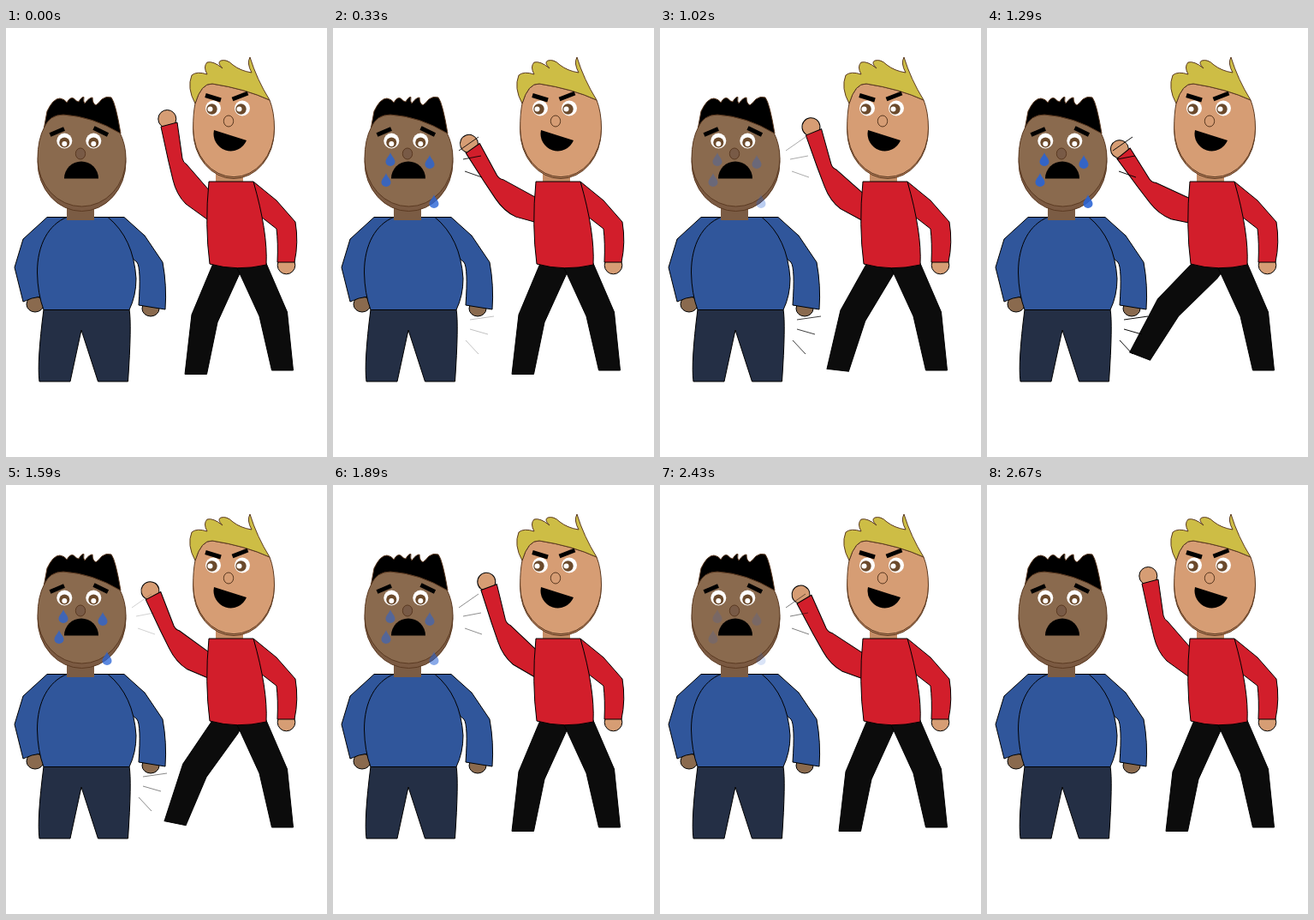
These frames come from a looping animation (375x500 px, 2.7 s). An HTML page:

```html
<!DOCTYPE html>
<html lang="en">
<head>
<meta charset="utf-8">
<title>Bully</title>
<style>
  html, body { margin: 0; width: 100%; height: 100%; overflow: hidden; background: #fff; }
  svg { display: block; width: 375px; height: 500px; }
  .line { stroke: #000; stroke-width: 1; }
  .thin { fill: none; stroke: #000; stroke-width: 1; }
  .blue { fill: #30569b; }
  .red { fill: #d21e2b; }
  .dark { fill: #8a6a4e; }
  .tan { fill: #d69d74; }
  .black { fill: #0c0c0c; }
  .face { stroke: #5b3a22; stroke-width: 1; }
  .white { fill: #fff; }
  .iris { fill: #6b4a2c; }
  .brow { fill: none; stroke: #000; stroke-width: 5; }
</style>
</head>
<body>
<svg viewBox="0 0 375 500">
  <defs>
    <path id="drop" d="M0-8C1-4 5.500-1 5.500 3A5.400 4.800 0 0 1-5.500 3C-5.500-1-1-4 0-8Z"/>
    <g id="sadEye">
      <circle class="white" r="9"/>
      <circle class="iris" cy="2" r="6"/>
      <circle class="white" cy="3.500" r="3"/>
    </g>
    <g id="angryEye">
      <circle class="white" r="9"/>
      <circle class="iris" cx="-1.500" cy="1" r="6.200"/>
      <circle class="white" cx="-3.500" cy="1" r="3"/>
    </g>
  </defs>

  <g id="victim">
    <g class="line dark">
      <ellipse cx="34" cy="322" rx="10" ry="9"/>
      <ellipse cx="169" cy="327" rx="10" ry="9"/>
    </g>
    <path class="line" fill="#242f45" d="M44 328H144Q147 345 142.500 412H107.500L88 352 75 412H39Q36 390 44 328Z"/>
    <g class="line blue">
      <path d="M71 220.500H48L20 246 10 279 20 319Q30 314 41 313L60 260Z"/>
      <path d="M103 220.500H138L162 242 183 273Q188 300 186 328L155 323Q158 280 153 273L140 262Z"/>
      <path d="M71 220.500C50 229 36.500 252 36.500 285Q37 310 44 328.500H144Q152 312 152 292Q149 245 119 220.500Z"/>
    </g>
    <path fill="#7b5c44" d="M71 203H103V224H71Z"/>
    <ellipse class="face" cx="88.500" cy="156" rx="51.500" ry="57.500" fill="#7b5a42"/>
    <path class="face dark" d="M45 115Q51 101 67 101Q101 103 133 122Q140 136 140 152A51.500 56 0 0 1 37 152Q37 130 45 115Z"/>
    <path class="face" fill="#000" d="M44.500 116L48 97Q55 82 63 82Q69 83 71 87Q75 80 79 82Q83 86 85 86Q88 80 91 80.500Q90 86 92 88Q97 81 101 81Q101 88 105 90Q108 88 112 83Q117 79 123 81Q128 87 134 123Q101 103 67 101Q51 101 44.500 116Z"/>
    <path class="brow" d="M51.500 124.500L68 117.500M102.500 116.500L119 124.500"/>
    <use href="#sadEye" x="68.300" y="131.500"/>
    <use href="#sadEye" x="102.300" y="131.500"/>
    <ellipse class="face" cx="87" cy="146.500" rx="5.700" ry="6.500" fill="#785a46"/>
    <path d="M68 175.500A20 20 0 0 1 108 175.500Z"/>
  </g>

  <g id="bully">
    <g id="arm" class="line">
      <circle class="tan" cx="188.300" cy="106" r="10.500"/>
      <path class="red" d="M181 115L200 110 206 152Q207 157 211 159L238 190 258 205 250 230 235 223 210 205Q199 194 195 177L189.500 154Z"/>
    </g>
    <path id="leg" class="line black" d="M243 272L217 334 209 403.500H234.500L247 343 273 286 278 268Z"/>
    <path class="line black" d="M266 272L273 286 296 336 310.500 399H335.500L328.500 331 303 272Z"/>
    <circle class="line tan" cx="327.500" cy="276.500" r="10.300"/>
    <path class="line red" d="M289 179L316 201 338 226Q342 250 337 273H317Q318 250 316 234L298 220Z"/>
    <path fill="#c58d66" d="M245 165H277V180H245Z"/>
    <path class="line red" d="M237 179H289Q306 238 304 276Q270 284 238 275Q232 230 237 179Z"/>
    <ellipse class="face" cx="266" cy="119.500" rx="47.300" ry="56" fill="#b97f58"/>
    <path class="face tan" d="M221 88Q228 64 241 65Q280 71 308 84Q313.500 98 313.500 117A47.300 56.500 0 0 1 218.700 117Q218.500 100 221 88Z"/>
    <path class="face" fill="#cdbd45" d="M221 88Q211 70 217 55Q223 50 235 54Q230 45 235 40Q242 38 253 47Q246 40 251 38Q258 36 265 43Q274 50 287 52Q281 41 285 34Q293 60 308 84Q280 71 241 65Q228 64 221 88Z"/>
    <path class="brow" d="M233 78.500L251 84M264.500 83L282.500 76"/>
    <use href="#angryEye" x="242" y="93.500"/>
    <use href="#angryEye" x="276" y="93.500"/>
    <ellipse class="face tan" cx="260" cy="108.500" rx="5.700" ry="6.500"/>
    <path d="M243 119L281 131A20 20 0 0 1 243 119Z"/>
  </g>

  <g id="tears" fill="#2964d6">
    <use href="#drop" x="67" y="153"/>
    <use href="#drop" x="62" y="177"/>
    <use href="#drop" x="113" y="156"/>
    <use href="#drop" x="118" y="202"/>
  </g>
  <path id="punch" class="thin" d="M147 143L170 127M152 153L173 149M154 167L174 174"/>
  <path id="kick" class="thin" d="M160 340L188 336M160 351L181 357M155 364L170 380"/>
</svg>
<script>
  const LOOP = 2700, STEP = 30;
  const byId = id => document.getElementById(id);
  const [arm, leg, tears, punch, kick] = ["arm", "leg", "tears", "punch", "kick"].map(byId);

  // Each track is a list of [time, value] keys joined by straight lines.
  const tracks = {
    arm: [[0, 0], [450, 1], [900, 0], [1350, 1], [1800, 0], [2250, 1], [2670, 0]],
    leg: [[900, 0], [1350, 1], [1800, 0]],
    tears: [[0, 0], [390, 1], [870, 0], [1320, 1], [2670, 0]],
    punch: [[0, 0], [390, 1], [870, 0], [1320, 1], [1650, 0], [2190, 1], [2670, 0]],
    kick: [[0, 0], [1350, 1], [1800, 0]]
  };

  function valueAt(keys, t) {
    const next = keys.findIndex(([time]) => time > t);
    if (next === 0) return keys[0][1];
    if (next < 0) return keys[keys.length - 1][1];
    const [t0, v0] = keys[next - 1], [t1, v1] = keys[next];
    return v0 + (v1 - v0) * (t - t0) / (t1 - t0);
  }

  const rotate = (el, angle, x, y) => el.setAttribute("transform", `rotate(${angle} ${x} ${y})`);

  function draw(now) {
    const t = Math.floor(now % LOOP / STEP) * STEP;
    rotate(arm, -27.8 * valueAt(tracks.arm, t), 254, 202);
    rotate(leg, 24.5 * valueAt(tracks.leg, t), 256, 278);
    tears.style.opacity = 0.95 * valueAt(tracks.tears, t);
    punch.style.opacity = valueAt(tracks.punch, t);
    kick.style.opacity = valueAt(tracks.kick, t);
  }

  const start = performance.now();
  function tick() {
    draw(performance.now() - start);
    requestAnimationFrame(tick);
  }
  tick();
</script>
</body>
</html>
```
